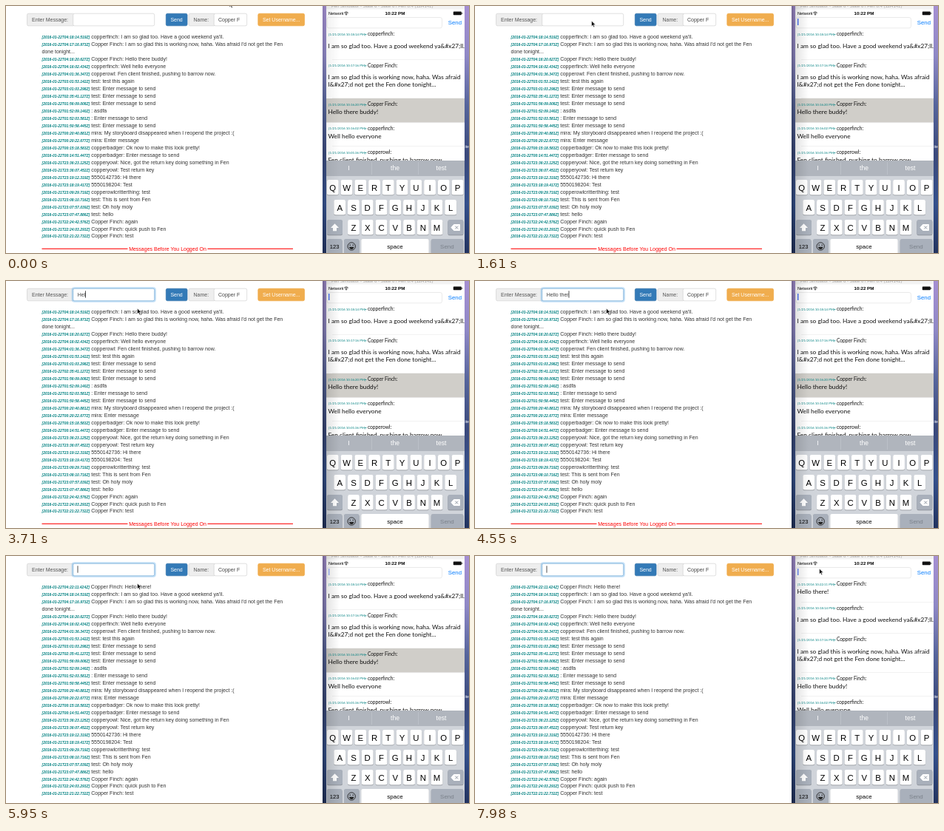
An HTML page that plays this animation: 626 px wide and 334 px high, repeating every 8000 ms.

```html
<!DOCTYPE html>
<html lang="en">
<head>
<meta charset="utf-8">
<title>Chat sync</title>
<style>
  html, body { margin: 0; width: 100%; height: 100%; overflow: hidden; background: #fff; }
  svg { display: block; width: 626px; height: 334px; }
  text { white-space: pre; }
  .web { font: 7px "Liberation Sans", Arial, sans-serif; fill: #333; }
  .stamp { font: italic bold 5px "Liberation Sans", Arial, sans-serif; fill: #008080; }
  .sys { font-family: "Liberation Sans", Arial, sans-serif; }
  .phone { font-family: Lato, "Open Sans", sans-serif; fill: #111; }
  .mid { text-anchor: middle; }
</style>
</head>
<body>
<svg id="stage" viewBox="0 0 626 334" xmlns="http://www.w3.org/2000/svg">
  <defs>
    <linearGradient id="wall" x2="0" y2="1">
      <stop offset="0" stop-color="#a58fd2"/>
      <stop offset=".2" stop-color="#8f88c6"/>
      <stop offset=".4" stop-color="#56659c"/>
      <stop offset=".6" stop-color="#3b4a7c"/>
      <stop offset=".8" stop-color="#34508c"/>
      <stop offset="1" stop-color="#22335f"/>
    </linearGradient>
    <linearGradient id="dim">
      <stop offset="0" stop-color="#000" stop-opacity=".3"/>
      <stop offset=".3" stop-color="#000" stop-opacity=".1"/>
      <stop offset="1" stop-color="#000" stop-opacity="0"/>
    </linearGradient>
    <clipPath id="listClip"><rect x="433" y="30" width="187" height="179"/></clipPath>
    <clipPath id="nameClip"><rect x="282" y="10" width="38" height="17"/></clipPath>
  </defs>
  <rect width="626" height="334" fill="#fff"/>
  <g id="form"></g>
  <g id="log"></g>
  <g id="desk"></g>
  <g clip-path="url(#listClip)"><g id="cells"></g></g>
  <g id="keys"></g>
  <rect id="shade" x="428" width="23" height="334" fill="url(#dim)"/>
  <path id="arrow" d="M0 0V7.6L1.8 6L3 8.7L4.3 8.1L3.1 5.5H5.5Z" fill="#111" stroke="#fff" stroke-width=".6"/>
</svg>
<script>
(() => {
const $ = id => document.getElementById(id);

function add(parent, tag, attrs, content) {
  const el = document.createElementNS('http://www.w3.org/2000/svg', tag);
  for (const k in attrs) el.setAttribute(k, attrs[k]);
  if (content !== undefined) el.textContent = content;
  parent.appendChild(el);
  return el;
}
const rect = (p, x, y, width, height, fill, more) =>
  add(p, 'rect', { x, y, width, height, fill, ...more });
const label = (p, x, y, str, cls, size, fill) =>
  add(p, 'text', { x, y, class: cls, style: (size ? `font-size:${size}px;` : '') + (fill ? `fill:${fill}` : '') }, str);
const box = (p, x, w, fill, stroke) =>
  rect(p, x, 10.2, w, 16.6, fill, { rx: 2, stroke, 'stroke-width': .6 });

// Form row
const form = $('form');
box(form, 28.5, 64, '#eee', '#ccc');
label(form, 35, 21, 'Enter Message:', 'web', 0, '#555');
const glow = rect(form, 89.6, 9.2, 112.3, 18.6, 'none', { rx: 3, stroke: '#66afe9', 'stroke-width': 2, 'stroke-opacity': .4 });
box(form, 90.7, 110, '#fff', '#ccc');
const ring = box(form, 90.7, 110, 'none', '#66afe9');
const typed = label(form, 96.7, 21, '', 'web', 0, '#444');
const webCaret = rect(form, 96.5, 13.3, .8, 9.4, '#222');
box(form, 216.3, 28.8, '#337ab7', '#2e6da4');
label(form, 230.6, 21, 'Send', 'web mid', 0, '#fff');
box(form, 247, 36, '#eee', '#ccc');
label(form, 253.5, 21, 'Name:', 'web', 0, '#555');
box(form, 281.2, 44.5, '#fff', '#ccc');
label(form, 287, 21, 'Copper F', 'web', 0, '#444').setAttribute('clip-path', 'url(#nameClip)');
box(form, 340.8, 62.8, '#f0ad4e', '#eea236');
label(form, 372.2, 21, 'Set Username...', 'web mid', 0, '#fff');

// Web message log, newest first
const entries = `22T04:22:11.424|Copper Finch: Hello there!
22T04:18:14.519|copperfinch: I am so glad too. Have a good weekend ya'll.
22T04:17:16.973|Copper Finch: I am so glad this is working now, haha. Was afraid I'd not get the Fen
done tonight...
22T04:16:20.627|Copper Finch: Hello there buddy!
22T04:16:02.434|copperfinch: Well hello everyone
22T04:01:36.347|copperowl: Fen client finished, pushing to barrow now.
22T03:01:53.142|test: test this again
22T03:01:03.298|test: Enter message to send
22T02:35:41.127|test: Enter message to send
22T01:56:09.008|test: Enter message to send
22T01:52:09.140|: asdfa
22T01:52:03.581|: Enter message to send
22T01:50:58.445|test: Enter message to send
22T00:20:40.881|mira: My storyboard disappeared when I reopend the project :(
22T00:20:22.677|mira: Enter message
22T00:15:18.583|copperbadger: Ok now to make this look pretty!
22T00:14:51.447|copperbadger: Enter message to send
21T23:36:23.125|copperyowl: Nice, got the return key doing something in Fen
21T23:36:07.452|copperyowl: Test return key
21T23:19:12.319|5550142736: Hi there
21T23:18:19.417|5550198204: Test
21T23:09:29.719|copperowlcritterthing: test
21T23:08:10.716|test: This is sent from Fen
21T23:07:57.039|test: Oh holy moly
21T23:07:47.886|test: hello
21T22:24:42.576|Copper Finch: again
21T22:24:03.293|Copper Finch: quick push to Fen
21T22:21:22.732|Copper Finch: test`.split('\n');
const ROW = 9.97;
const log = $('log');
const rows = entries.map((line, i) => {
  const el = add(log, 'text', { x: 48.5, y: 44.3 + i * ROW, class: 'web' });
  const [stamp, body] = line.split('|');
  if (body) add(el, 'tspan', { class: 'stamp' }, `[2016-01-${stamp}Z]`);
  add(el, 'tspan', {}, body ? ' ' + body : stamp);
  return el;
});
const ruleY = 44.3 + entries.length * ROW + 2.3;
rect(log, 48.5, ruleY + 2, 116, 1.2, '#f22');
rect(log, 272.5, ruleY + 2, 115.5, 1.2, '#f22');
label(log, 218.5, ruleY + 5, 'Messages Before You Logged On', 'web mid', 0, '#f00');

// Desktop strip and phone header
const desk = $('desk');
rect(desk, 428, 0, 198, 334, 'url(#wall)');
label(desk, 620.6, 192, 'ite', 'sys', 5, '#fff');
rect(desk, 433, 0, 187, 334, '#fff');
rect(desk, 433, 0, 187, 4.5, '#f3f3f3');
label(desk, 440, 2.2, 'Fen Simulator - Slate 6 - Slate 6 / Fen 8.4 (12H141)', 'sys', 6, '#a5a5a5');
label(desk, 436, 12.3, 'Network', 'sys', 5.6);
add(desk, 'path', { d: 'M457.3 9.2Q460 6.7 462.7 9.2M458.5 10.6Q460 9.3 461.5 10.6', fill: 'none', stroke: '#111', 'stroke-width': .9 });
add(desk, 'circle', { cx: 460, cy: 11.8, r: .7 });
label(desk, 526, 12.4, '10:22 PM', 'sys mid', 6.2).style.fontWeight = 'bold';
rect(desk, 604.8, 7.6, 11, 4.6, '#111', { rx: .8 });
rect(desk, 616.3, 9, .8, 1.8, '#111');
rect(desk, 434, 15.5, 155.5, 14.3, '#fff', { rx: 2.5, stroke: '#dcdcdc', 'stroke-width': .6 });
label(desk, 597.8, 25, 'Send', 'sys', 7.8, '#007aff');
const phoneCaret = rect(desk, 436, 17, 1.4, 9, '#426bf2');

// Phone message list
const cellData = [
  [32.5, '22:11', 'Copper Finch', 'Hello there!'],
  [42.5, '18:14', 'copperfinch', 'I am so glad too. Have a good weekend ya&#x27;ll.'],
  [52.5, '17:16', 'Copper Finch', 'I am so glad this is working now, haha. Was afraid', 'I&#x27;d not get the Fen done tonight...'],
  [32.5, '16:20', 'Copper Finch', 'Hello there buddy!'],
  [32.5, '16:02', 'copperfinch', 'Well hello everyone'],
  [32.5, '01:36', 'copperowl', 'Fen client finished, pushing to barrow now.']
];
const cells = $('cells');
let cellTop = 30, picked;
cellData.forEach(([h, time, name, ...lines], i) => {
  if (i === 3) picked = rect(cells, 433, cellTop, 187, h, '#d0cec9');
  rect(cells, 441, cellTop + h - .4, 179, .4, '#dedede');
  label(cells, 435.8, cellTop + 9.9, `[1/21/2016 10:${time} PM]`, 'phone', 4.35, '#008080');
  rect(cells, 485.3, cellTop + 8, 2.2, .7, '#008080');
  label(cells, 489, cellTop + 10.4, name + ':', 'phone', 6.6);
  const first = cellTop + (h > 32.5 ? 26.8 : 21.4);
  lines.forEach((s, n) => label(cells, 435.5, first + n * 9.8, s, 'phone', 8.3));
  cellTop += h;
});

// Keyboard
const keys = $('keys');
rect(keys, 433, 209, 187, 125, '#d0d4da');
rect(keys, 433, 209, 187, 21, '#b0b5bd');
[494.5, 557].forEach(x => rect(keys, x, 211, .5, 17, '#c9cdd3'));
['I', 'the', 'test'].forEach((s, i) => label(keys, 463.5 + i * 62.5, 221.8, s, 'sys mid', 8.6, '#fff'));

function key(x, y, w, fill = '#fff') {
  rect(keys, x, y + .7, w, 20.6, '#888c92', { rx: 2.4 });
  rect(keys, x, y, w, 20.6, fill, { rx: 2.4 });
}
const DARK = '#a9b0bb';
[['QWERTYUIOP', 441.8], ['ASDFGHJKL', 451.2], ['ZXCVBNM', 470]].forEach(([row, x0], r) => {
  const y = 235 + r * 27;
  [...row].forEach((ch, i) => {
    const x = x0 + i * 18.75;
    key(x - 7.9, y, 15.8);
    label(keys, x, y + 14.5, ch, 'sys mid', 11.4);
  });
});
key(434, 289, 21, DARK);
add(keys, 'path', { d: 'M444.5 294.2L450 300H447V304.2H442V300H439Z', fill: '#fff' });
key(597.4, 289, 21, DARK);
add(keys, 'path', { d: 'M602 299.5L605.5 295.5H613.5V303.5H605.5Z', fill: '#fff', stroke: '#fff', 'stroke-linejoin': 'round' });
add(keys, 'path', { d: 'M607.3 297.5L611.3 301.5M611.3 297.5L607.3 301.5', stroke: '#8f97a3' });
key(434, 315, 20.5, DARK);
label(keys, 444.2, 328, '123', 'sys mid', 7.6);
key(457, 315, 20.5, DARK);
add(keys, 'circle', { cx: 467.2, cy: 325, r: 5.2, fill: 'none', stroke: '#222', 'stroke-width': .9 });
add(keys, 'path', { d: 'M464 325.8H470.4Q469.8 329 467.2 329T464 325.8Z', fill: '#222' });
[465.2, 469.2].forEach(cx => add(keys, 'circle', { cx, cy: 323.3, r: .8, fill: '#222' }));
key(480.2, 315, 91.6);
label(keys, 526, 327.6, 'space', 'sys mid', 8);
key(574.8, 315, 43.6, DARK);
label(keys, 596.4, 327.6, 'Send', 'sys mid', 8, '#7b818a');

// Timeline
const LOOP = 8000, TICK = 70;
const FOCUS = 2030, SENT = 5950, SYNCED = 6020;
const message = 'Hello there!';
const strokes = [3500, 3640, 3710, 3850, 3990, 4130, 4270, 4340, 4410, 4550, 4620, 4900];
// start, end, x, y, optional control point
const moves = [
  [70, 490, 172, 22],
  [690, 770, 171, 22],
  [1540, 1680, 144, 18],
  [2030, 2380, 177.5, 37],
  [6930, 7700, 465.5, 17, 320, 77]
];
const clamp = v => Math.max(0, Math.min(1, v));
const ease = p => p * p * (3 - 2 * p);
const show = (el, on) => el.setAttribute('opacity', +on);

function pointer(t) {
  let x = 302, y = -6;
  for (const [start, end, ex, ey, cx = (x + ex) / 2, cy = (y + ey) / 2] of moves) {
    if (t < start) break;
    const p = ease(clamp((t - start) / (end - start))), q = 1 - p;
    x = q * q * x + 2 * p * q * cx + p * p * ex;
    y = q * q * y + 2 * p * q * cy + p * p * ey;
  }
  return [x, y];
}

function webCaretOn(t) {
  if (t < FOCUS) return false;
  if (t < strokes[0]) return t < 2520 || t >= 3010;
  return t < SENT || Math.floor((t - SENT) / 490) % 2 === 0;
}

function phoneCaretAlpha(t) {
  const since = (t - 125 + 1040) % 1040;
  return clamp(since / 110) * (1 - clamp((since - 550) / 160));
}

function draw(t) {
  const sent = t >= SENT, synced = t >= SYNCED;
  const text = sent ? '' : message.slice(0, strokes.filter(s => s <= t).length);
  typed.textContent = text;
  webCaret.setAttribute('x', 96.6 + (text ? typed.getComputedTextLength() : 0));
  show(webCaret, webCaretOn(t));
  const focus = clamp((t - FOCUS + TICK) / 150);
  show(glow, focus);
  show(ring, focus);

  log.setAttribute('transform', `translate(0 ${sent ? 0 : -ROW})`);
  show(rows[0], sent);
  cells.setAttribute('transform', `translate(0 ${synced ? 0 : -32.5})`);
  show(picked, !synced);
  show(phoneCaret, phoneCaretAlpha(t));
  show($('shade'), .5 + .5 * clamp((t - 1050) / 140));
  $('arrow').setAttribute('transform', `translate(${pointer(t)})`);
}

function frame() {
  const t = performance.now() % LOOP;
  draw(Math.floor(t / TICK) * TICK);
  requestAnimationFrame(frame);
}
frame();
})();
</script>
</body>
</html>
```
